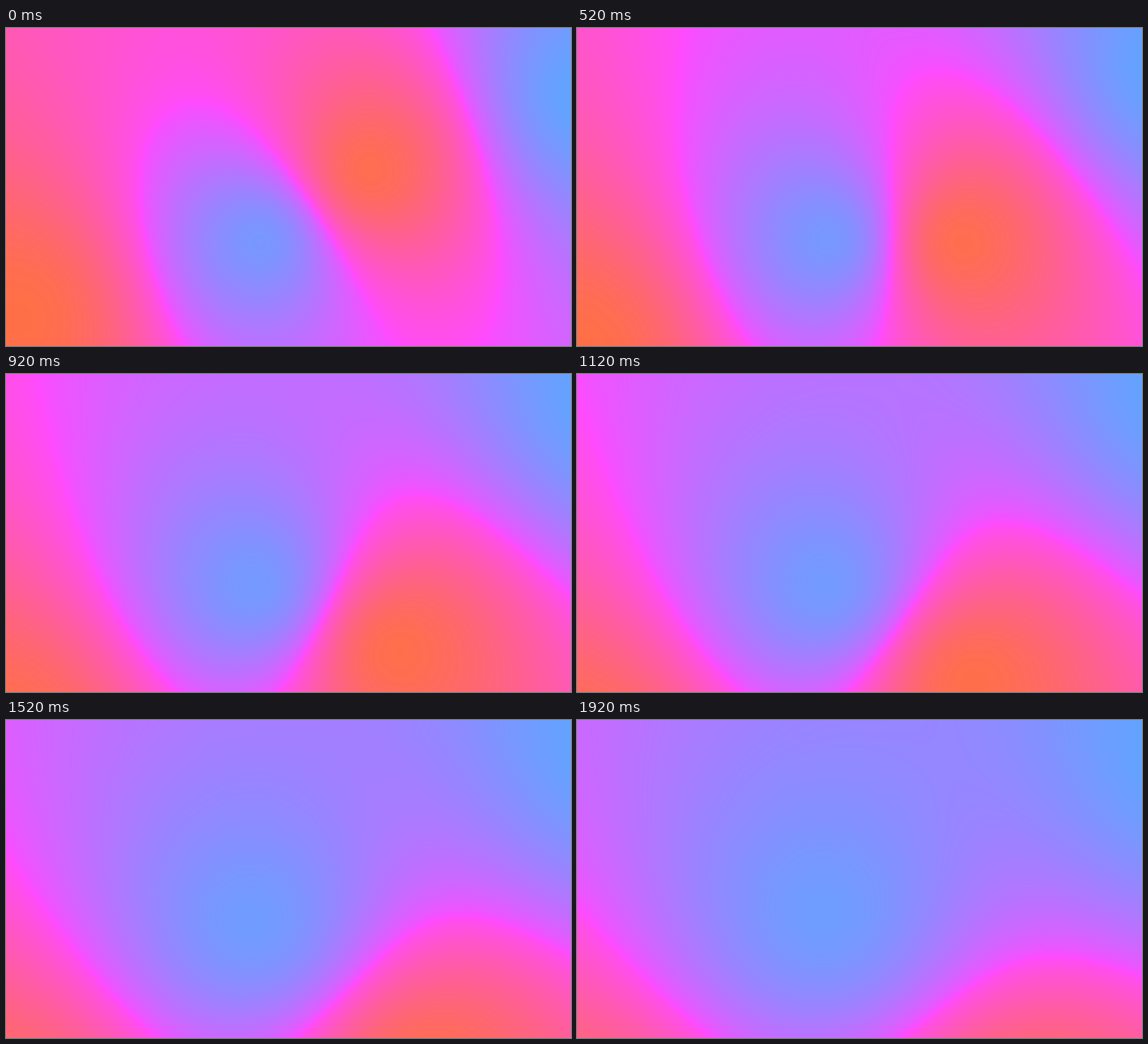
Animation, 800 px wide and 450 px high, one loop 2 s. Source, as an HTML page with a canvas:

```html
<!DOCTYPE html>
<html>
<head>
<meta charset="utf-8">
<title>Drifting gradient</title>
<style>
html, body { margin: 0; width: 100%; height: 100%; overflow: hidden; }
canvas { display: block; width: 800px; height: 450px; }
</style>
</head>
<body>
<canvas id="stage" width="800" height="450"></canvas>
<script>
const W = 800, H = 450, LOOP = 2000, FPS = 15;
const SOFT = 40;        // radius that rounds off each centre
const CONTRAST = 0.7;   // below 1 sharpens the magenta ridge
const blue = [90, 168, 255], magenta = [255, 74, 255], orange = [255, 112, 67];

// Drifting centres: heat from -1 (blue) to 1 (orange), path of [tick, x, y]
const spots = [
  { heat: 1, path: [[0, 20, 410], [8, 3, 460], [17, 0, 565], [29, 0, 665]] },
  { heat: 1, path: [[0, 511, 203], [4, 527, 238], [8, 540, 303], [17, 557, 435], [29, 630, 600]] },
  { heat: -0.85, path: [[0, 364, 299], [17, 353, 300], [29, 350, 275]] },
  { heat: -1, path: [[0, 830, 95], [17, 882, 20], [29, 890, 42]] }
];

function place({ heat, path }, tick) {
  const next = Math.max(1, path.findIndex(([t]) => t >= tick));
  const [t0, x0, y0] = path[next - 1], [t1, x1, y1] = path[next];
  const s = (tick - t0) / (t1 - t0);
  return { heat, x: x0 + (x1 - x0) * s, y: y0 + (y1 - y0) * s };
}

const ctx = document.getElementById("stage").getContext("2d");
const image = ctx.createImageData(W, H);

// Each pixel averages the heat of all centres, weighted by inverse squared distance
function draw(tick) {
  const centres = spots.map(spot => place(spot, tick));
  let p = 0;
  for (let y = 0; y < H; y++) {
    for (let x = 0; x < W; x++) {
      let sum = 0, total = 0;
      for (const c of centres) {
        const weight = 1 / ((x - c.x) ** 2 + (y - c.y) ** 2 + SOFT ** 2);
        sum += c.heat * weight;
        total += weight;
      }
      const end = sum < 0 ? blue : orange;
      const mix = Math.abs(sum / total) ** CONTRAST;
      for (let ch = 0; ch < 3; ch++)
        image.data[p++] = magenta[ch] + (end[ch] - magenta[ch]) * mix;
      image.data[p++] = 255;
    }
  }
  ctx.putImageData(image, 0, 0);
}

// 15 pictures a second, shown on a 40 ms beat
const start = performance.now();
let shown = -1;
function play() {
  const time = Math.max(0, performance.now() - start) % LOOP;
  const tick = Math.floor((Math.floor(time / 40) * 40 + 39.9) * FPS / 1000);
  if (tick !== shown) draw(shown = tick);
  requestAnimationFrame(play);
}
play();
</script>
</body>
</html>
```
